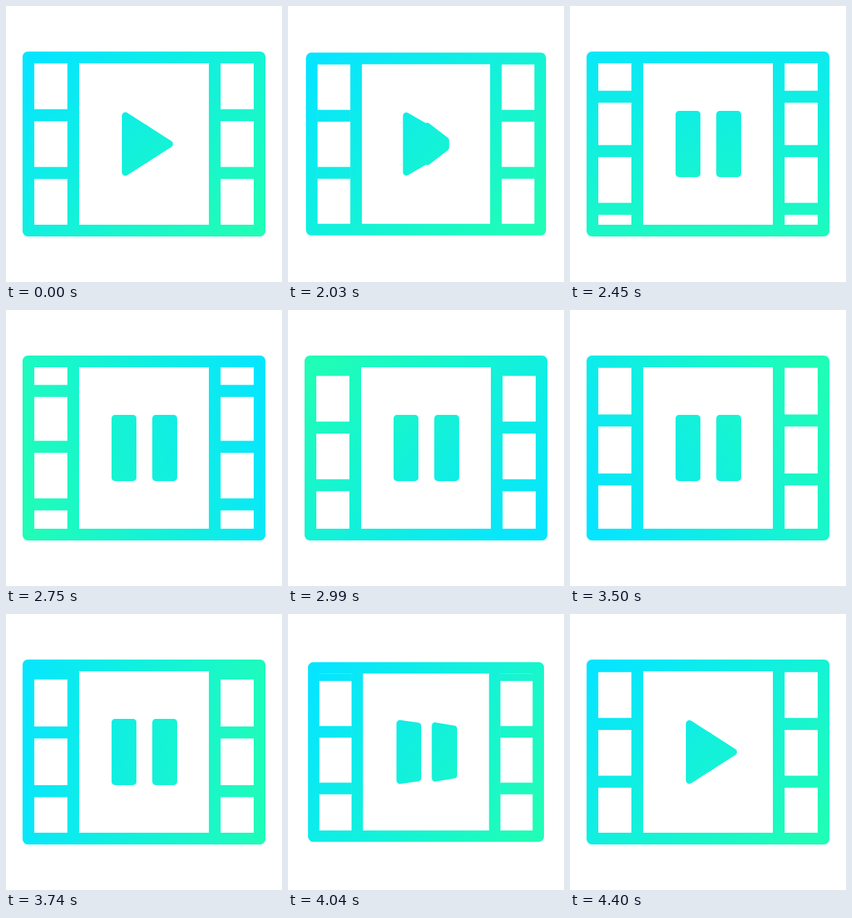
Write an HTML page with a canvas that moves like this. It is 400x400 px and loops after 4430 ms.

```html
<!DOCTYPE html>
<html lang="en">
<head>
<meta charset="utf-8">
<title>Film player</title>
<style>
  html, body { margin: 0; width: 100%; height: 100%; overflow: hidden; background: #fff; }
  canvas { display: block; width: 400px; height: 400px; }
</style>
</head>
<body>
<canvas id="stage" width="400" height="400"></canvas>
<script>
const ctx = document.getElementById('stage').getContext('2d');

const LOOP = 4430, HOLD = 2030, STEP = 30;
const PITCH = 83.75, BAR = 17.4;
const TOP = 83, BOTTOM = 317;

// Keys are [time, value] pairs.
const STRIP = [[2000, 0], [2450, 52], [2750, 123.5], [3230, 226], [3740, 266], [4400, 252.3], [4430, 251.25]];
const LEAD = [[2000, 0], [2450, 5], [2750, 3], [3230, -2], [3740, -3], [4400, 0]];
const ANGLE = [[2000, 45], [2450, 83], [2750, 167], [3230, 277], [3740, 365], [4400, 405]];
const TIP = [[0, 237], [0.12, 229], [0.4, 234], [1, 243]];

const lerp = (a, b, u) => a + (b - a) * u;
const clamp = (v, lo = 0, hi = 1) => Math.min(hi, Math.max(lo, v));

// Smooth curve through the keys, at rest on both ends.
function curve(keys, t) {
  const last = keys.length - 1;
  if (t <= keys[0][0]) return keys[0][1];
  if (t >= keys[last][0]) return keys[last][1];
  let i = 0;
  while (t > keys[i + 1][0]) i++;
  const slope = k => k === 0 || k === last ? 0
    : (keys[k + 1][1] - keys[k - 1][1]) / (keys[k + 1][0] - keys[k - 1][0]);
  const [t0, a] = keys[i], [t1, b] = keys[i + 1];
  const d = t1 - t0, u = (t - t0) / d, v = 1 - u;
  return a * v * v * (1 + 2 * u) + b * u * u * (3 - 2 * u)
    + d * u * v * (v * slope(i) - u * slope(i + 1));
}

function gradient(degrees) {
  const a = degrees * Math.PI / 180;
  const x = 195 * Math.cos(a), y = 195 * Math.sin(a);
  const fill = ctx.createLinearGradient(200 - x, 200 - y, 200 + x, 200 + y);
  fill.addColorStop(0, '#06e5ff');
  fill.addColorStop(1, '#20fdb6');
  return fill;
}

function drawFrame(paint) {
  ctx.fillStyle = paint;
  ctx.beginPath();
  ctx.roundRect(24, 66, 352, 268, 8);
  ctx.fill();
  ctx.fillStyle = '#fff';
  for (const [x, w] of [[41, 48], [106, 188], [311, 48]]) ctx.fillRect(x, TOP, w, BOTTOM - TOP);
}

function drawBars(paint, offset, lead) {
  ctx.fillStyle = paint;
  const shift = (offset % PITCH + PITCH) % PITCH;
  for (let k = -1; k < 4; k++) {
    let y = 74.5 + k * PITCH + shift;
    y += lead * clamp((205 - y) / 75);
    const top = Math.max(TOP, y - BAR / 2);
    const height = Math.min(BOTTOM, y + BAR / 2) - top;
    if (height <= 0) continue;
    for (const x of [41, 311]) ctx.fillRect(x - 0.5, top, 49, height);
  }
}

// A symmetric, round-cornered piece: half-heights at its left and right sides.
function drawPiece(left, leftHalf, right, rightHalf) {
  ctx.beginPath();
  ctx.moveTo(left, 200 - leftHalf);
  ctx.lineTo(right, 200 - rightHalf);
  ctx.lineTo(right, 200 + rightHalf);
  ctx.lineTo(left, 200 + leftHalf);
  ctx.closePath();
  ctx.fill();
  ctx.stroke();
}

// u = 0 is the play triangle, u = 1 the pause bars.
function drawButton(paint, u) {
  ctx.fillStyle = ctx.strokeStyle = paint;
  ctx.lineWidth = 10;
  ctx.lineJoin = 'round';
  const half = from => lerp(from, 43, u);
  drawPiece(lerp(173, 158, u), half(41), lerp(203, 184, u), half(21.8));
  drawPiece(lerp(200, 217, u), half(23.7), curve(TIP, u), half(0));
}

const pulse = (t, start) => {
  const u = (t - start) / 320;
  return u > 0 && u < 1 ? 0.04 * Math.sin(Math.PI * u) : 0;
};

function draw(t) {
  const scale = 1 - pulse(t, 2000) - pulse(t, 3960);
  const morph = clamp((t - 2000) / 250) - clamp((t - 3990) / 250);
  const paint = gradient(curve(ANGLE, t));
  ctx.fillStyle = '#fff';
  ctx.fillRect(0, 0, 400, 400);
  ctx.save();
  ctx.translate(200, 200);
  ctx.scale(scale, scale);
  ctx.translate(-200, -200);
  drawFrame(paint);
  drawBars(paint, curve(STRIP, t), curve(LEAD, t));
  drawButton(paint, morph);
  ctx.restore();
}

const start = performance.now();
function tick() {
  const t = (performance.now() - start) % LOOP;
  draw(t < HOLD ? 0 : HOLD + Math.floor((t - HOLD) / STEP) * STEP);
  requestAnimationFrame(tick);
}
tick();
</script>
</body>
</html>
```
